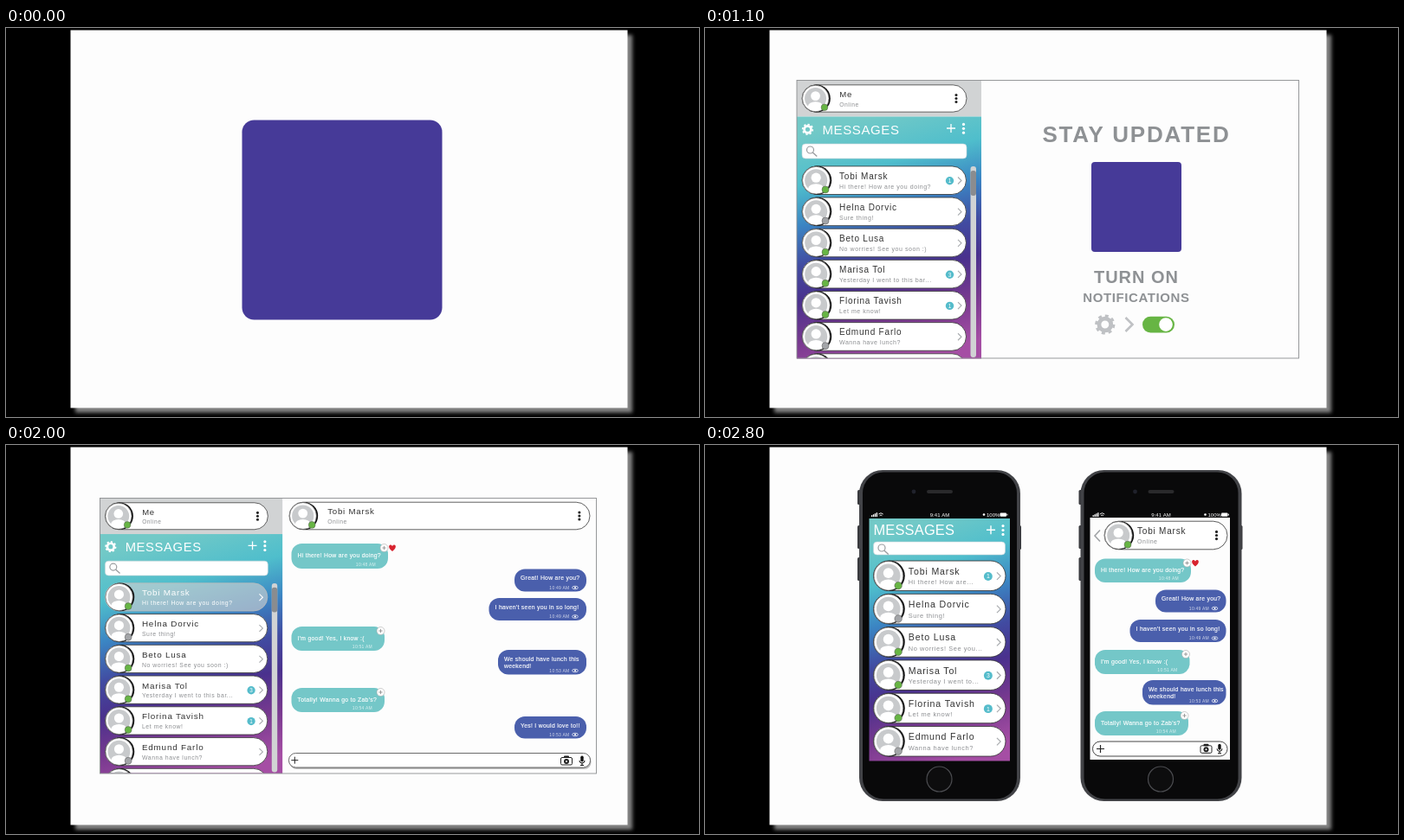
An HTML page that plays this animation: 800x450 px, repeating every 2900 ms.

```html
<!DOCTYPE html>
<html lang="en">
<head>
<meta charset="utf-8">
<title>Messaging app slideshow</title>
<style>
  html, body { margin: 0; width: 100%; height: 100%; overflow: hidden; background: #000; }
  svg { display: block; width: 100vw; height: 100vh; font-family: "Liberation Sans", Arial, sans-serif; }
</style>
</head>
<body>
<svg id="stage" viewBox="0 0 800 450"></svg>
<script>
const LOOP = 2900;
const CUTS = [1000, 1700, 2300];
const INDIGO = '#463a98', TEAL = '#74c7c8', BLUE = '#4a5fac', GREEN = '#67b544';

// Basic shapes
const rect = (x, y, w, h, fill, r = 0, more = '') =>
  `<rect x="${x}" y="${y}" width="${w}" height="${h}" rx="${r}" fill="${fill}" ${more}/>`;
const circle = (x, y, r, fill, more = '') => `<circle cx="${x}" cy="${y}" r="${r}" fill="${fill}" ${more}/>`;
const line = (d, color, width, more = '') =>
  `<path d="${d}" fill="none" stroke="${color}" stroke-width="${width}" ${more}/>`;
const text = (x, y, size, str, fill, spacing = 0, more = '') =>
  `<text x="${x}" y="${y}" font-size="${size}" fill="${fill}" letter-spacing="${spacing}" ${more}>${str}</text>`;
const place = (x, y, s, content) => `<g transform="translate(${x} ${y}) scale(${s})">${content}</g>`;

// Icons
const plus = (x, y, r, color, width = 1.3) => line(`M${x - r} ${y}h${2 * r}M${x} ${y - r}v${2 * r}`, color, width);
const kebab = (x, y, gap, color) => [-1, 0, 1].map(i => circle(x, y + i * gap, 1.6, color)).join('');
const chevron = (x, y, r, color, width) => line(`M${x - r / 2} ${y - r}l${r} ${r}l${-r} ${r}`, color, width);
const gear = (x, y, r, color) =>
  circle(x, y, r * .6, 'none', `stroke="${color}" stroke-width="${r * .42}"`) +
  circle(x, y, r * .88, 'none', `stroke="${color}" stroke-width="${r * .26}" pathLength="16" stroke-dasharray="1"`);
const heart = (x, y) => `<path d="M${x} ${y + 4}c-7 -5 -3 -10 0 -6c3 -4 7 1 0 6" fill="#d8232f"/>`;
const eye = (x, y) =>
  `<ellipse cx="${x}" cy="${y}" rx="3.4" ry="1.8" fill="none" stroke="#fff" stroke-width=".7"/>` + circle(x, y, 1.1, '#fff');
const camera = (x, y) =>
  rect(x - 6.5, y - 3.5, 13, 8.5, '#fff', 1.5, 'stroke="#222"') + rect(x - 3, y - 5.5, 6, 2.5, '#222', 1) +
  circle(x, y + 1, 3, '#222') + circle(x, y + 1, 1, '#fff');
const mic = (x, y) =>
  rect(x - 1.7, y - 5.5, 3.4, 7, '#111', 1.7) + line(`M${x - 3} ${y}q0 3 3 3q3 0 3 -3M${x} ${y + 3}v2.5M${x - 2} ${y + 5.5}h4`, '#111', 1);

const avatar = on =>
  circle(17.6, 0, 16.6, '#111') + circle(16.4, 0, 15.9, '#fff', 'stroke="#555" stroke-width=".6"') +
  circle(16.2, 0, 13, '#c8cacc') + circle(16.2, -3, 5.6, '#fff') +
  '<ellipse cx="16.2" cy="9.4" rx="9" ry="5.4" fill="#fff"/>' +
  circle(27, 10.7, 4, on ? GREEN : '#a3a5a8', 'stroke="#555" stroke-width=".5"');

// Pill with an avatar: contact rows and profile headers
function pill(x, y, w, s, name, sub, { on = true, badge, menu, selected, nameX = 43 } = {}) {
  const width = w / s;
  const fill = selected ? 'rgba(205,207,210,.65)' : '#fff';
  const end = menu ? kebab(width - 12.5, 0, 4.1, '#222')
    : chevron(width - 7.5, 0.3, 4, selected ? '#fff' : '#a8abae', 1.1);
  const count = badge
    ? circle(width - 19, .6, 4.7, '#55bccb') + text(width - 19, 3, 6.5, badge, '#fff', 0, 'text-anchor="middle"') : '';
  return place(x, y, s,
    rect(0, -16.3, width, 32.6, fill, 16.3, `stroke="${selected ? '#bbb' : '#333'}" stroke-width=".8"`) + avatar(on) +
    text(nameX, -1.6, 10, name, selected ? '#fff' : '#333', .8) +
    text(nameX, 9.4, 7, sub, selected ? '#fff' : '#8d8f92', .55) + count + end);
}

const contacts = [
  ['Tobi Marsk', 'Hi there! How are you doing?', 'Hi there! How are...', 1, 1],
  ['Helna Dorvic', 'Sure thing!', 'Sure thing!', 0],
  ['Beto Lusa', 'No worries! See you soon :)', 'No worries! See you...', 1],
  ['Marisa Tol', 'Yesterday I went to this bar...', 'Yesterday I went to...', 1, 3],
  ['Florina Tavish', 'Let me know!', 'Let me know!', 1, 1],
  ['Edmund Farlo', 'Wanna have lunch?', 'Wanna have lunch?', 0],
  ['', '', '', 1]
];
const friend = contacts[0][0];

const searchBox = (x, y, w, h) =>
  rect(x, y, w, h, '#fff', 4, 'stroke="#c8d4d8" stroke-width=".6"') +
  circle(x + 9.5, y + 7, 4, 'none', 'stroke="#9a9da0" stroke-width="1.2"') + line(`M${x + 12.3} ${y + 10}l5 4.5`, '#9a9da0', 1.4);

const sidebar = chatOpen =>
  rect(106, 60.5, 213, 42, '#d1d3d4') + rect(106, 102.5, 213, 280, 'url(#sky)') +
  pill(112, 81.5, 190, .96, 'Me', 'Online', { menu: true, nameX: 45 }) +
  gear(118.5, 117.3, 6.6, '#fff') + text(135.5, 122.6, 15, 'MESSAGES', '#fff', .6) +
  plus(284, 116, 5, '#fff') + kebab(298.5, 116.3, 4.9, '#fff') + searchBox(112, 134, 190, 17) +
  rect(306.5, 160, 6.5, 221, '#d1d3d4', 3) + rect(306.5, 165, 6.5, 29, '#8a8c8f', 3) +
  '<g clip-path="url(#panel)">' + contacts.map(([name, sub, , on, badge], i) => {
    const selected = chatOpen && i === 0;
    return pill(112, 176.2 + 36.15 * i, 189.5, 1, name, sub, { on, badge: selected ? 0 : badge, selected });
  }).join('') + '</g>' +
  (chatOpen ? '' : rect(106, 60.5, 579.5, 321.5, 'none', 0, 'stroke="#8c8e90" stroke-width=".9"'));

// Chat bubble; incoming ones carry a reaction button, outgoing ones a read mark
function bubble(mine, x0, x1, y0, y1, message, time, liked) {
  const lines = message.split('|');
  const base = y0 + (mine ? 12.6 : 15.8);
  const extra = mine ? eye(x1 - 13, y1 - 4.5)
    : circle(x1 - 4.5, y0 + 5, 4.5, '#fff', 'stroke="#aaa" stroke-width=".6"') + plus(x1 - 4.5, y0 + 5, 2.2, '#888', .8);
  return rect(x0, y0, x1 - x0, y1 - y0, mine ? BLUE : TEAL, 12) +
    lines.map((l, i) => text(x0 + 7, base + 8.8 * i, 6.8, l, '#fff', .3, 'stroke="#fff" stroke-width=".15"')).join('') +
    text(x1 - (mine ? 19.5 : 14), y1 - 2.6, 5, time, 'rgba(255,255,255,.75)', .25, 'text-anchor="end"') +
    extra + (liked ? heart(x1 + 5, y0 + 5) : '');
}
const talk = [
  [0, 'Hi there! How are you doing?', '10:48 AM', 1],
  [1, 'Great! How are you?', '10:49 AM'],
  [1, "I haven't seen you in so long!", '10:49 AM'],
  [0, "I'm good! Yes, I know :(", '10:51 AM'],
  [1, 'We should have lunch this|weekend!', '10:53 AM'],
  [0, "Totally! Wanna go to Zab's?", '10:54 AM'],
  [1, 'Yes! I would love to!!', '10:53 AM']
];
const chat = boxes => boxes.map((box, i) => bubble(talk[i][0], ...box, ...talk[i].slice(1))).join('');

const logoScene = rect(272.5, 106.5, 231, 231, INDIGO, 14);

const heading = (y, size, str, spacing) =>
  text(498, y, size, str, '#8e9194', spacing, 'text-anchor="middle" font-weight="bold"');
const notifyScene = sidebar(false) +
  heading(132, 26, 'STAY UPDATED', 1.8) + rect(446, 155, 104, 104, INDIGO, 4) +
  heading(294.5, 20, 'TURN ON', 1) + heading(316.8, 15, 'NOTIFICATIONS', .6) +
  gear(461.8, 343, 11.5, '#bfc1c4') + chevron(489.5, 343, 8, '#bfc1c4', 2.6) +
  rect(505, 333.8, 37, 18.6, GREEN, 9.3) + circle(532, 343.1, 7.8, '#fff');

const chatScene = `<g transform="translate(3.66 1.66) scale(.989)">${sidebar(true)}</g>` +
  rect(108.5, 61.5, 573, 318.5, 'none', 0, 'stroke="#8c8e90" stroke-width=".9"') +
  pill(327, 82, 347, .97, friend, 'Online', { menu: true, nameX: 45.5 }) +
  chat([[329.5, 441, 114, 143], [587, 670, 143.5, 169.5], [557.5, 670, 177, 203], [329.5, 437, 210, 238],
    [568, 670, 237, 265.5], [329.5, 437, 281, 309], [587, 670, 314, 339.5]]) +
  rect(327.5, 358, 348, 17, '#bbb', 8) + rect(326.5, 356.5, 348, 16.5, '#fff', 8, 'stroke="#444" stroke-width=".8"') +
  plus(333.3, 364.7, 4, '#222', 1) + camera(647, 365) + mic(665, 365);

// Handset with a status bar, drawn at the left position
const phone = (dx, screen) => `<g transform="translate(${dx} 0)">` +
  [[52, 17], [93, 27], [130, 27]].map(([y, h]) => rect(176, y, 4, h, '#38393d', 1.5)).join('') + rect(362, 93, 3, 28, '#38393d', 1.5) +
  rect(178, 29, 186, 383, '#424347', 27) + rect(182, 31.5, 178, 378, '#09090a', 24) +
  circle(241, 54, 2.4, '#20222c') + rect(256, 52, 30, 4, '#2a2a2c', 2) +
  circle(270.5, 386.5, 14.5, '#0d0d0e', 'stroke="#4b4c50" stroke-width="1.2"') +
  [0, 1, 2, 3].map(i => rect(192 + 1.9 * i, 81.2 - i, 1.3, 1.8 + i, '#fff')).join('') +
  line('M200.3 80q2.7 -2.6 5.4 0M201.6 81.7q1.4 -1.4 2.8 0', '#fff', .9) +
  text(271, 82.8, 6, '9:41 AM', '#fff', .1, 'text-anchor="middle"') + circle(322, 80.5, 1.3, '#fff') +
  text(325, 82.8, 6, '100%', '#fff') + rect(340.5, 78.4, 7.5, 4.4, '#fff', 1) + rect(348.4, 79.7, 1, 1.8, '#fff') +
  '</g>' + screen;

const inboxScreen = rect(189.5, 85, 162.5, 280.5, 'url(#sky)') +
  text(194.5, 104, 16.4, 'MESSAGES', '#fff', .2) + plus(330, 98.2, 5, '#fff', 1.4) + kebab(344, 98.5, 4.9, '#fff') +
  searchBox(194.5, 112, 152, 15) +
  contacts.slice(0, 6).map(([name, , sub, on, badge], i) =>
    pill(194.5, 151.3 + 38.3 * i, 152.5, 1.06, name, sub, { on, badge, nameX: 38 })).join('');

const chatScreen = rect(444.5, 84, 161.5, 280, '#fdfdfd') +
  line('M456 98.5l-6 6.5l6 6.5', '#a0a3a6', 1.6) +
  pill(461, 104.5, 142, 1, friend, 'Online', { menu: true, nameX: 38 }) +
  chat([[450, 561, 131.5, 159], [520, 601.5, 167.5, 193.5], [490.5, 601.5, 202, 228], [450, 559.5, 237, 265],
    [505, 601.5, 272, 300.5], [450, 558, 308, 336]]) +
  rect(447.5, 343, 155.5, 17, '#fff', 8.5, 'stroke="#333" stroke-width=".9"') +
  plus(456.5, 351.5, 4.5, '#222', 1.2) + camera(578.5, 351.3) + mic(594, 351.3);

const phoneScene = phone(0, inboxScreen) + phone(255.5, chatScreen);

const sky = [[0, '#72c9c7'], [.2, '#4fbecc'], [.36, '#3b85c3'], [.52, '#414ba1'], [.66, '#4a318d'], [.82, '#77398f'], [1, '#a54ea4']];
const stage = document.getElementById('stage');
stage.innerHTML = `<defs>
  <linearGradient id="sky" x1=".4" y1="0" x2=".6" y2="1">
    ${sky.map(([at, color]) => `<stop offset="${at}" stop-color="${color}"/>`).join('')}
  </linearGradient>
  <clipPath id="panel"><rect x="106" y="60" width="213" height="322"/></clipPath>
  <filter id="soft"><feGaussianBlur stdDeviation="2"/></filter>
</defs>` +
  rect(80, 8, 643, 437, '#848484', 0, 'filter="url(#soft)"') + rect(74.5, 2.5, 643, 437, '#fdfdfd') +
  [logoScene, notifyScene, chatScene, phoneScene].map(scene => `<g class="scene">${scene}</g>`).join('');

const scenes = stage.querySelectorAll('.scene');
function draw() {
  const t = performance.now() % LOOP;
  const current = CUTS.filter(cut => t >= cut).length;
  scenes.forEach((scene, i) => { scene.style.display = i === current ? '' : 'none'; });
  requestAnimationFrame(draw);
}
draw();
</script>
</body>
</html>
```
